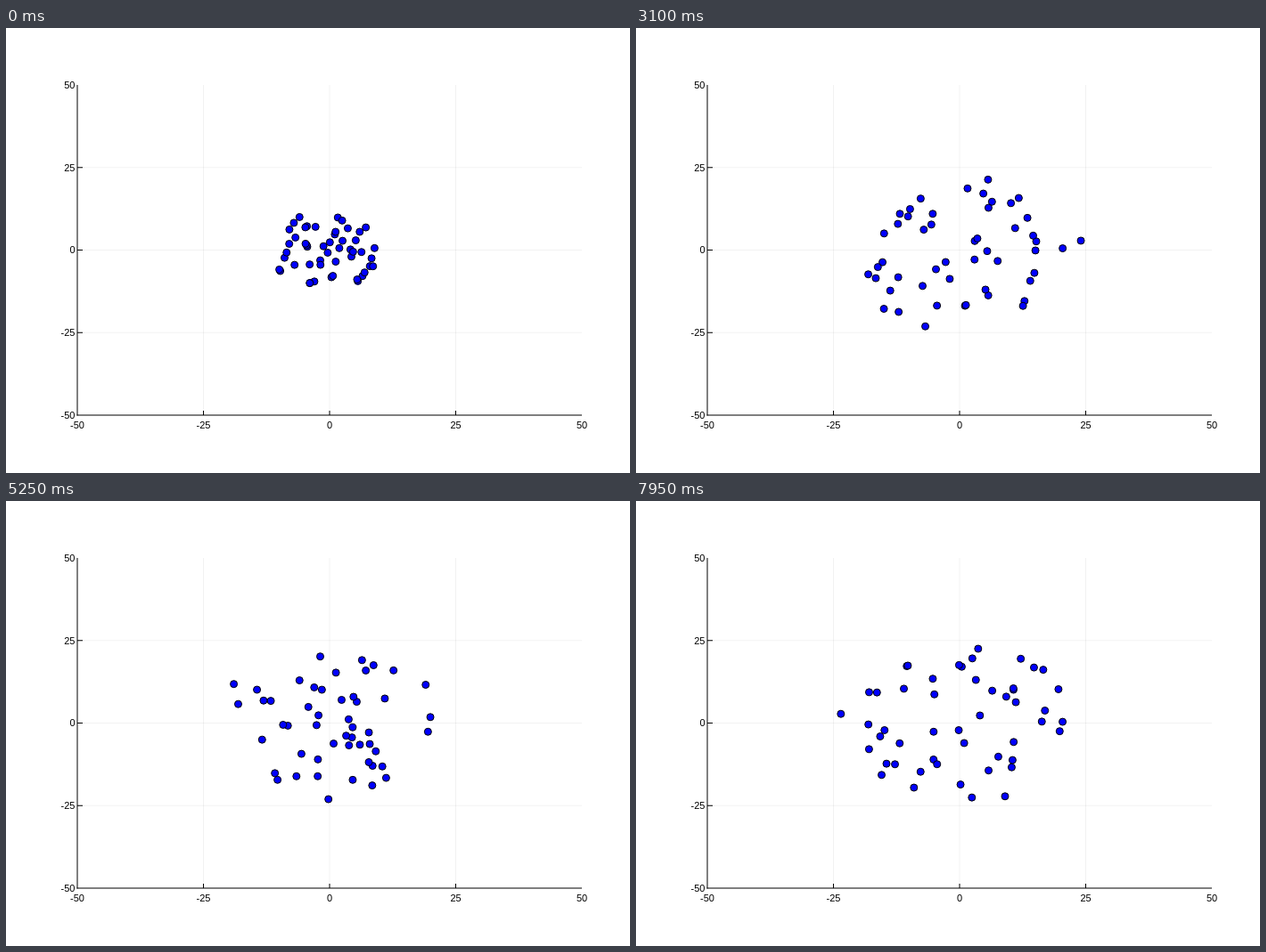
These frames come from a looping animation (700x500 px, 8000 ms). An HTML page:

```html
<!DOCTYPE html>
<html lang="en">
<head>
<meta charset="utf-8">
<title>Particle cloud</title>
<style>
  html, body { margin: 0; width: 100%; height: 100%; overflow: hidden; background: #fff; }
  svg { display: block; }
  text { font: 11px "Liberation Sans", Arial, sans-serif; fill: #000; }
  .grid { stroke: #000; stroke-opacity: .05; stroke-width: 1; }
  .axis { stroke: #000; stroke-width: 1; }
  circle { fill: #00f; stroke: #000; stroke-width: 1; }
</style>
</head>
<body>
<svg id="plot" width="700" height="500" viewBox="0 0 700 500"></svg>
<script>
const STEP = 50, STEPS = 160;
const LEFT = 80, RIGHT = 646, TOP = 64, BOTTOM = 435;
const COUNT = 50, BOX = 10, SPREAD = 25, LIMIT = 25;
const GOLDEN = Math.PI * (3 - Math.sqrt(5));

const plot = document.getElementById('plot');
const px = x => LEFT + (x + 50) / 100 * (RIGHT - LEFT);
const py = y => BOTTOM - (y + 50) / 100 * (BOTTOM - TOP);

function add(name, attrs, label) {
  const el = document.createElementNS('http://www.w3.org/2000/svg', name);
  for (const key in attrs) el.setAttribute(key, attrs[key]);
  if (label !== undefined) el.textContent = label;
  plot.appendChild(el);
  return el;
}

const line = (cls, x1, y1, x2, y2) => add('line', { class: cls, x1, y1, x2, y2 });

function drawAxes() {
  for (const v of [-25, 0, 25]) {
    line('grid', px(v), TOP, px(v), BOTTOM);
    line('grid', LEFT, py(v), RIGHT, py(v));
  }
  line('axis', LEFT, TOP, LEFT, BOTTOM + .5);
  line('axis', LEFT - .5, BOTTOM, RIGHT, BOTTOM);
  for (const v of [-50, -25, 0, 25, 50]) {
    if (Math.abs(v) < 50) {
      line('axis', px(v), BOTTOM - 5, px(v), BOTTOM);
      line('axis', LEFT, py(v), LEFT + 6, py(v));
    }
    add('text', { x: px(v), y: 450, 'text-anchor': 'middle' }, v);
    add('text', { x: 77.5, y: py(v) + 3.9, 'text-anchor': 'end' }, v);
  }
}

function makeRandom(seed) {
  return () => {
    seed = (seed * 16807) % 2147483647;
    return seed / 2147483647;
  };
}

const random = makeRandom(4127);
const jitter = size => (random() * 2 - 1) * size;
const clamp = v => Math.max(-BOX, Math.min(BOX, v));

// A particle leaves a small square for its place in a round cloud (hx, hy),
// then drifts along an ellipse whose other axis is (u, v)
function makeParticle(i) {
  const share = Math.sqrt((i + .5) / COUNT);
  const angle = i * GOLDEN;
  const cos = Math.cos(angle), sin = Math.sin(angle);
  const side = BOX * share / Math.max(Math.abs(cos), Math.abs(sin));
  const hx = SPREAD * share * cos + jitter(2);
  const hy = SPREAD * share * sin + jitter(2);
  const r = 14 * Math.sqrt(random());
  const a = 2 * Math.PI * random();
  return {
    x: clamp(side * cos + jitter(2)),
    y: clamp(side * sin + jitter(2)),
    hx, hy,
    u: r * Math.cos(a) - hy * .7,
    v: r * Math.sin(a) + hx * .7,
    rate: .019 + .007 * random(),
    dot: add('circle', { r: 4 })
  };
}

drawAxes();
const particles = Array.from({ length: COUNT }, (_, i) => makeParticle(i));

function draw(n) {
  const grow = Math.sin(Math.min(n / 48, 1) * Math.PI / 2) ** 1.5;
  const drift = n ** 4 / (n ** 3 + 60 ** 3);
  for (const p of particles) {
    const c = Math.cos(p.rate * drift);
    const s = Math.sin(p.rate * drift);
    const x = (p.x + (p.hx - p.x) * grow) * c + p.u * s;
    const y = (p.y + (p.hy - p.y) * grow) * c + p.v * s;
    // Soft round wall
    const k = (1 + (Math.hypot(x, y) / LIMIT) ** 8) ** -.125;
    p.dot.setAttribute('cx', px(x * k).toFixed(2));
    p.dot.setAttribute('cy', py(y * k).toFixed(2));
  }
}

let begin = null;
function tick(now) {
  if (begin === null) begin = now;
  draw(Math.floor((now - begin) / STEP) % STEPS);
  requestAnimationFrame(tick);
}
draw(0);
requestAnimationFrame(tick);
</script>
</body>
</html>
```
